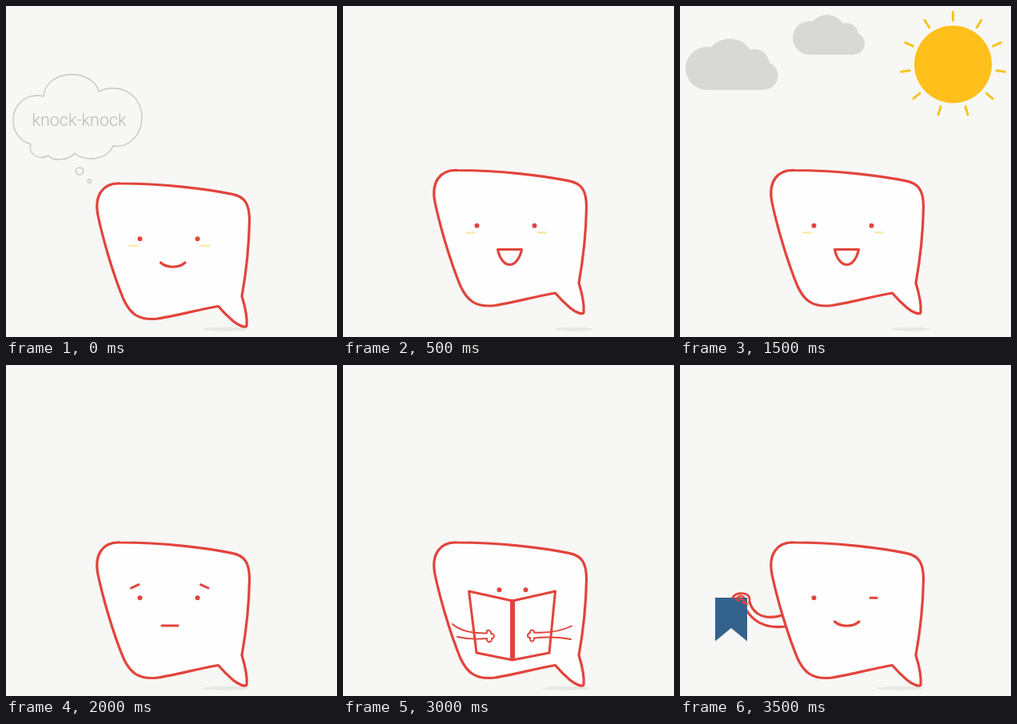
These frames come from a looping animation (414x414 px, 4 s). An HTML page with a canvas:

```html
<!DOCTYPE html>
<html lang="en">
<head>
<meta charset="utf-8">
<title>Speech bubble moods</title>
<style>
html, body { margin: 0; width: 100%; height: 100%; overflow: hidden; background: #f7f7f6; }
canvas { display: block; width: 100vw; height: 100vh; }
</style>
</head>
<body>
<canvas id="stage" width="414" height="414"></canvas>
<script>
const ctx = document.getElementById('stage').getContext('2d');
const POSE_MS = 500;
const C = {
  bg: '#f7f7f6', paper: '#fefefe', line: '#e2443c', sun: '#ffc01c', ray: '#f3c41c',
  cloud: '#d8d8d6', thought: '#c8c8c6', word: '#b8b8b6', cheek: '#fbe8a8',
  shadow: '#e8e8e4', ribbon: '#33628c'
};

const BODY = `M143 222 C195 222 250 228.5 283 235.4 C299 238.5 304.5 248 304.5 268
  C304 300 300 335 295 363 C299 376 302 390 301 400 C300 403 291 400 284 394
  C277 388 271 382 265.5 375.5 C240 380 210 388 190 391 C165 394 155 384 147 367
  C133 333 121 290 115 262 C110 237 121 221 143 222Z`;
const THOUGHT = `M47 113 C48 95 65 85.5 83 85.5 C100 86 113 95 116 107
  C140 95 170 110 170 139 C170 162 153 178 134 175 C125 195 95 194 86 184
  C78 194 58 194 53 187 C40 194 27 184 31 173 C15 168 9 155 9 143
  C9 122 27 108 47 113Z`;

function draw(d, { stroke = C.line, fill, width = 3.2 } = {}) {
  const path = new Path2D(d);
  if (fill) { ctx.fillStyle = fill; ctx.fill(path); }
  if (stroke) { ctx.strokeStyle = stroke; ctx.lineWidth = width; ctx.stroke(path); }
}

function disc(x, y, r, fill, stroke, width) {
  ctx.beginPath();
  ctx.arc(x, y, r, 0, Math.PI * 2);
  if (fill) { ctx.fillStyle = fill; ctx.fill(); }
  if (stroke) { ctx.strokeStyle = stroke; ctx.lineWidth = width; ctx.stroke(); }
}

function spoke(cx, cy, angle, inner, outer, color, width) {
  const dx = Math.sin(angle), dy = -Math.cos(angle);
  draw(`M${cx + dx * inner} ${cy + dy * inner} L${cx + dx * outer} ${cy + dy * outer}`,
    { stroke: color, width });
}

function shadow(x, rx) {
  ctx.fillStyle = C.shadow;
  ctx.beginPath();
  ctx.ellipse(x, 404.3, rx, 2.5, 0, 0, Math.PI * 2);
  ctx.fill();
}

const body = () => draw(BODY, { fill: C.paper });
const eye = (x, y = 291.3) => disc(x, y, 3, C.line);
const eyes = () => { eye(167.5); eye(239.5); };
const smile = () => draw('M193.5 321 C201 328 216 328 224 321');
const laugh = () => draw('M193.5 321 H223.5 C221 333 215 340 208.5 340 C202 340 196 333 193.5 321Z');
const cheeks = () => draw('M154.5 300 H164 M244.5 300 H254', { stroke: C.cheek, width: 2.4 });

function happy(mouth) {
  body();
  eyes();
  cheeks();
  mouth();
}

function hop(mouth) {
  shadow(288.5, 24);
  ctx.save();
  ctx.translate(0, -16.5);
  happy(mouth);
  ctx.restore();
}

// Leans the bubble to the right, pivoting where its tail begins.
function leaningBody() {
  ctx.save();
  ctx.translate(261, 363);
  ctx.rotate(33.5 * Math.PI / 180);
  ctx.translate(-265.5, -375.5);
  body();
  ctx.restore();
}

function arm(outline, edges) {
  draw(outline, { fill: C.paper, stroke: null });
  draw(edges);
}

function knock() {
  draw(THOUGHT, { stroke: C.thought, width: 1.5 });
  disc(92, 206.5, 4.6, null, C.thought, 1.5);
  disc(104.5, 219, 2.2, null, C.thought, 1.5);
  ctx.fillStyle = C.word;
  ctx.font = '300 21.5px Roboto, sans-serif';
  ctx.textAlign = 'center';
  ctx.fillText('knock-knock', 91.5, 150);
  shadow(275, 29);
  happy(smile);
}

function spinner(cx, cy) {
  ctx.lineCap = 'butt';
  for (let i = 1; i <= 12; i++) {
    const k = (i - 1) / 11;
    const mix = (a, b) => Math.round(a + (b - a) * k);
    const gray = mix(236, 112);
    spoke(cx, cy, i * Math.PI / 6, 10, 20,
      `rgb(${gray},${gray},${mix(244, 128)})`, 4);
  }
  ctx.lineCap = 'round';
}

function waiting() {
  shadow(275, 30);
  arm('M154 205 C157 222 166 233 181 236 L176 251 C158 244 147 233 147 210Z',
    'M154 205 C157 222 166 233 181 236 M176 251 C158 244 147 233 147 210');
  leaningBody();
  disc(145, 62, 31.7, C.paper, C.line, 3.2);
  spinner(146, 61);
  draw('M145.5 94 V268', { width: 4.4 });
  draw('M145 200 C138 205 132 199 133.5 191 C137 182 148 181 154 185 C158 189 156 197 154 205',
    { width: 2.8 });
  draw('M143 189 Q149 184 155 189 M145 199 Q146 190 151 199', { width: 2.4 });
  eye(242, 202);
  eye(259.5, 213);
  draw('M236 190 Q242 186 248 190 M268 204 Q275 207 274 214 M232 239 Q246 250 262 240',
    { width: 2.8 });
}

function cloud(x, y, scale) {
  ctx.save();
  ctx.translate(x, y);
  ctx.scale(scale, scale);
  for (const [cx, cy, r] of [[27, -27, 27], [55, -33, 31], [86, -32, 19], [98, -18, 17.5]])
    disc(cx, cy, r, C.cloud);
  ctx.fillRect(27, -27, 71, 27);
  ctx.restore();
}

function sunny() {
  cloud(7, 105, 1);
  cloud(141, 61, 0.78);
  disc(341.5, 73, 48.5, C.sun);
  for (let i = 0; i < 11; i++)
    spoke(341.5, 73, i * Math.PI * 2 / 11, 55, 65.5, C.ray, 3);
  hop(laugh);
}

function worried() {
  shadow(275, 29);
  body();
  eyes();
  draw('M156.5 279 L166 274.7 M243.5 274.7 L253 279 M195 326 H215', { width: 3 });
}

function reading(gaze) {
  shadow(279, 29.5);
  body();
  eye(195.5 + gaze, 281.3);
  eye(228.5 + gaze, 281.3);
  draw('M157.5 283 L212 295 L265.5 283 L258 360 L212 369 L167 360Z', { fill: C.paper, width: 3 });
  draw('M212 296 V367', { width: 6 });
  draw('M137 324 Q150 336 180 335.5 M143 340 Q160 344 180 342', { width: 1.9 });
  draw('M286 326.5 Q266 336 239 334.5 M285 343 Q262 339 239 341.5', { width: 1.9 });
  draw(`M180 335 C178 330 186 331 185 336 C190 336 190 342 186 342
    C187 348 179 348 180 342`, { fill: C.paper, width: 1.9 });
  draw(`M239 334.5 C239 330 233 331 234 335 C230 336 230 341 234 341
    C233 347 240 347 239 341.5`, { fill: C.paper, width: 1.9 });
}

function bookmark() {
  shadow(275, 29);
  arm('M87 297 C93 314 108 319 128 313 L132 327 C108 330 92 322 82 305Z',
    'M87 297 C93 314 108 319 128 313 M132 327 C108 330 92 322 82 305');
  body();
  draw('M44 291 H84 V345.5 L64 329 L44 345.5Z', { fill: C.ribbon, stroke: null });
  draw('M66 291 C69 285 80 284 85 288 C88 291 87 294 87 298', { width: 2.8 });
  draw('M70 293 Q74 287 80 290 M72 295 Q77 290 81 296 M78 297 L84 299', { width: 2.2 });
  eye(167.5);
  draw('M238 291.3 H246', { width: 3 });
  smile();
}

const poses = [
  knock, () => hop(laugh), waiting, sunny,
  worried, () => reading(-3), () => reading(0), bookmark
];
const start = performance.now();

function render() {
  const elapsed = performance.now() - start;
  ctx.fillStyle = C.bg;
  ctx.fillRect(0, 0, 414, 414);
  ctx.lineCap = ctx.lineJoin = 'round';
  poses[Math.floor(elapsed / POSE_MS) % poses.length]();
  requestAnimationFrame(render);
}
render();
</script>
</body>
</html>
```
